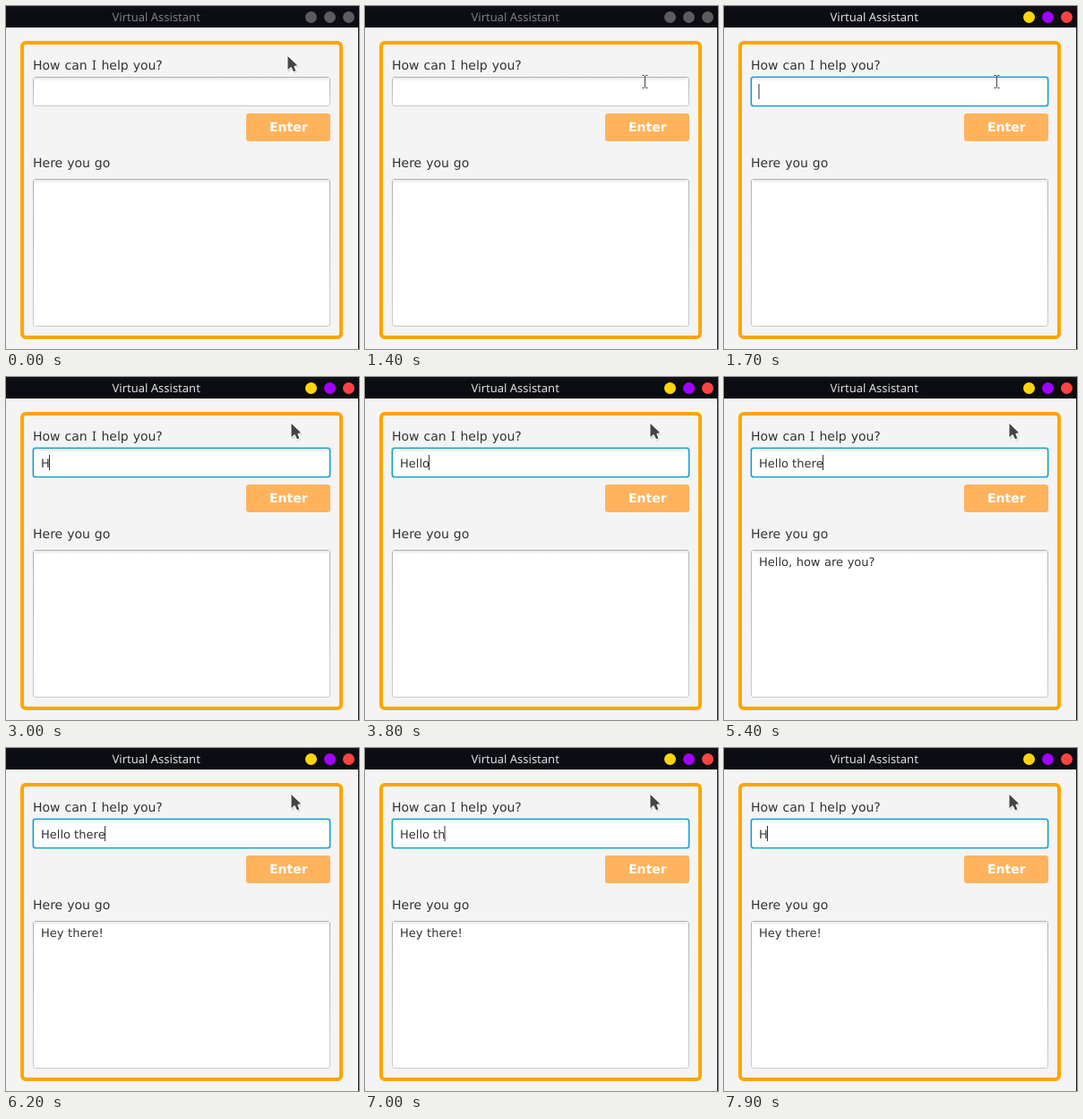
Write an HTML page that moves like this. It is 394 px wide and 383 px high and loops after 8000 ms.

```html
<!DOCTYPE html>
<html lang="en">
<head>
<meta charset="utf-8">
<title>Virtual Assistant</title>
<style>
html, body { margin: 0; width: 100%; height: 100%; overflow: hidden; background: #f4f4f4; }
svg { display: block; width: 394px; height: 383px; }
text { font: 14px "DejaVu Sans", sans-serif; fill: #333; word-spacing: .034em;
  white-space: pre; text-rendering: geometricPrecision; }
#input, #reply { font-size: 13px; }
#input { word-spacing: 0; font-kerning: none; }
#title { font: 13px "Noto Sans", sans-serif; word-spacing: 0; }
.serif { font: 14.4px "Noto Sans", sans-serif; }
.button { font-weight: bold; fill: #fff; }
</style>
</head>
<body>
<svg viewBox="0 0 394 383">
  <defs>
    <linearGradient id="edge" x2="0" y2="1">
      <stop stop-color="#b2b2b2"/><stop offset="1" stop-color="#cbcbcb"/>
    </linearGradient>
    <linearGradient id="bar" x2="0" y2="1">
      <stop stop-color="#13141a"/><stop offset=".2" stop-color="#0c0d12"/>
    </linearGradient>
    <linearGradient id="shade" x2="0" y2="1">
      <stop stop-color="#e9e9e9"/><stop offset="1" stop-color="#fff"/>
    </linearGradient>
  </defs>
  <rect width="394" height="383" fill="#f4f4f4"/>
  <rect width="394" height="24" fill="url(#bar)"/>
  <rect x="393" y="24" width="1" height="359" fill="#1b1c21"/>
  <text id="title" x="118.5" y="17">Virtual Assistant</text>
  <g id="dots">
    <circle cx="340.5" cy="12.5" r="6.5"/>
    <circle cx="361.5" cy="12.5" r="6.5"/>
    <circle cx="382.5" cy="12.5" r="6.5"/>
  </g>

  <rect x="18" y="41" width="356" height="329" rx="4" fill="none" stroke="#ffa500" stroke-width="4"/>
  <text x="30" y="71">How can <tspan class="serif" dx=".5">I</tspan><tspan dx=".6"> help you?</tspan></text>
  <text x="30" y="180">Here you go</text>

  <rect x="30.5" y="79.5" width="331" height="32" rx="2.5" fill="#fff" stroke="url(#edge)"/>
  <rect x="31" y="80" width="330" height="4" fill="url(#shade)"/>
  <g id="focus" fill="none">
    <rect x="30" y="79" width="332" height="33" rx="3" stroke="#a5d9ec" stroke-width="2"/>
    <rect x="30.5" y="79.5" width="331" height="32" rx="2.5" stroke="#0a9cc8" stroke-width="1.2"/>
  </g>
  <rect x="30.5" y="193.5" width="331" height="164" rx="2.5" fill="#fff" stroke="url(#edge)"/>
  <rect x="31" y="194" width="330" height="4" fill="url(#shade)"/>

  <rect x="268" y="120" width="94" height="31" rx="3" fill="#ffb35c"/>
  <text class="button" x="294" y="140">Enter</text>
  <text id="input" x="39" y="101"></text>
  <rect id="caret" y="87" width="1" height="17" fill="#333"/>
  <text id="reply" x="39" y="211"></text>

  <g id="arrow">
    <path d="M1 2V19L5 15.500 7.500 20.500 11 19 9 14 13 13Z" fill="#000" opacity=".12"/>
    <path d="M0 0V17L4.200 13.500 6.800 19 10 17.500 7.800 12.500 12 11.500Z"
      fill="#444" stroke="#fff" stroke-width="1" stroke-linejoin="round"/>
  </g>
  <path id="beam" d="M-3-7H-1L0-6 1-7H3M0-6V6M-3 7H-1L0 6 1 7H3" fill="none" stroke="#444"/>
</svg>
<script>
const $ = id => document.getElementById(id);
const [title, dots, focus, input, caret, reply, arrow, beam] =
  ["title", "dots", "focus", "input", "caret", "reply", "arrow", "beam"].map($);
const LOOP = 8000, FOCUS = 1700;

// Each track lists [start time, value].
const pointer = [
  [0, ["arrow", 314, 55]], [1400, ["beam", 312.5, 84.5]], [1500, ["beam", 304.5, 91.5]],
  [1700, ["beam", 304.5, 84.5]], [1800, ["arrow", 311, 67]], [1900, ["arrow", 316, 55]],
  [2000, ["arrow", 318, 51]]
];
const typed = [
  [0, ""], [3000, "H"], [3100, "He"], [3300, "Hel"], [3400, "Hell"], [3800, "Hello"],
  [3900, "Hello "], [4100, "Hello w"], [4500, "Hello "], [4700, "Hello th"],
  [4800, "Hello the"], [5000, "Hello there"], [6800, "Hello ther"], [7000, "Hello th"],
  [7100, "Hell"], [7200, ""], [7900, "H"]
];
const caretOn = [
  [0, false], [FOCUS, true], [2300, false], [2700, true], [5900, false],
  [6200, true], [6700, false], [6800, true], [7800, false], [7900, true]
];
const answer = [[0, ""], [5400, "Hello, how are you?"], [6200, "Hey there!"]];

const at = (track, t) => track.findLast(([start]) => start <= t)[1];
const show = (el, on) => el.setAttribute("visibility", on ? "visible" : "hidden");

function draw(now) {
  const t = now % LOOP, active = t >= FOCUS;
  title.style.fill = active ? "#dcdde0" : "#7c7d82";
  [...dots.children].forEach((dot, i) =>
    dot.setAttribute("fill", active ? ["#ffd60a", "#a200ff", "#ff4343"][i] : "#5b5b60"));
  show(focus, active);

  input.textContent = at(typed, t);
  reply.textContent = at(answer, t);
  const width = input.textContent ? input.getComputedTextLength() : 0;
  caret.setAttribute("x", 38.5 + Math.floor(width * 2) / 2);
  show(caret, at(caretOn, t));

  const [shape, x, y] = at(pointer, t);
  show(arrow, shape === "arrow");
  show(beam, shape === "beam");
  $(shape).setAttribute("transform", `translate(${x} ${y})`);
  requestAnimationFrame(draw);
}
requestAnimationFrame(draw);
</script>
</body>
</html>
```
